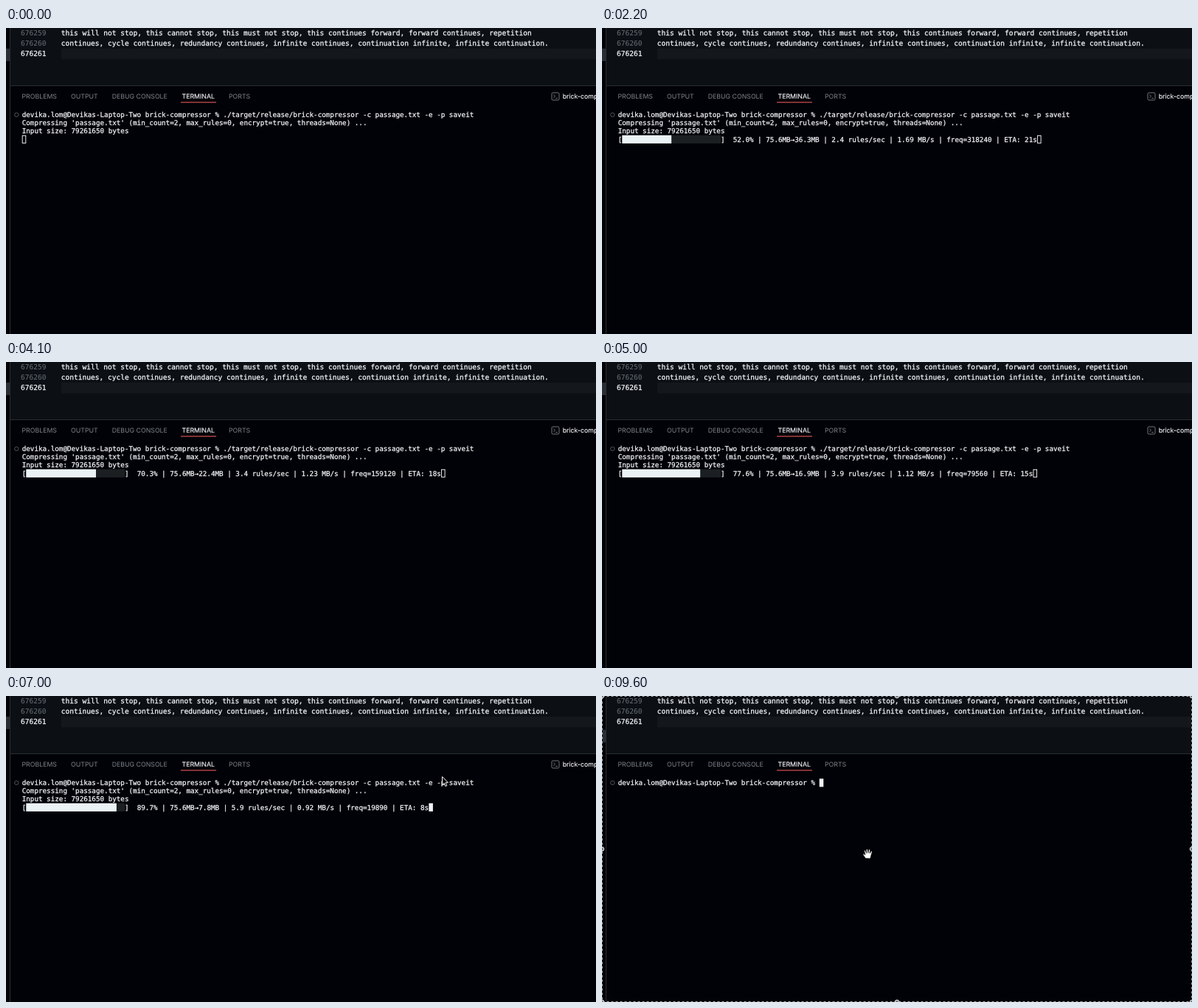
Recreate the animation shown at these times as an HTML page. Size 800x416 px, loop 9.7 s.

```html
<!DOCTYPE html>
<html lang="en">
<head>
<meta charset="utf-8">
<title>Terminal compression run</title>
<style>
  html, body { margin: 0; width: 100%; height: 100%; overflow: hidden; background: #010207; }
  svg { display: block; width: 800px; height: 416px; }
  text { white-space: pre; text-rendering: geometricPrecision; }
  .mono { font-family: "DejaVu Sans Mono", monospace; fill: #f6f8fb; stroke: #f6f8fb; stroke-width: .25px; }
  .editor { font-size: 9.565px; }
  .term { font-size: 9.255px; }
  .tab { font: 8.77px Inter, sans-serif; fill: #7d838b; }
  .on { fill: #f4f6f9; stroke: #f4f6f9; stroke-width: .12px; }
  .num { fill: #6a7078; stroke: none; }
</style>
</head>
<body>
<svg viewBox="0 0 800 416">
  <rect width="800" height="416" fill="#010207"/>
  <rect x="5" width="795" height="78" fill="#0c1015"/>
  <rect x="75" y="28" width="725" height="14.5" fill="#14171c"/>
  <rect id="handle" y="28" width="5" height="17" fill="#2a2e33"/>
  <path d="M5.5 0V416M5 78.5H800" stroke="#292d33" fill="none"/>
  <g id="editor"></g>
  <g id="tabs"></g>
  <rect x="237" y="100.4" width="48" height="1.3" fill="#c64c4e"/>
  <g id="label">
    <rect x="740" y="88" width="10" height="10" rx="1.5" fill="none" stroke="#8f949b" stroke-width=".8"/>
    <path d="M742.3 90.6l2.3 2.2-2.3 2.2M745.3 95.6h2.6" fill="none" stroke="#8f949b" stroke-width=".8"/>
    <text class="tab on" x="754.7" y="95.8">brick-compressor</text>
  </g>
  <g id="screen"></g>
  <path id="arrow" d="M0 0V11.2L2.6 8.8 4.4 13 6.3 12.2 4.5 8.1H8Z"
        fill="#000" stroke="#fff" stroke-width="1" stroke-linejoin="round"/>
  <g id="selection">
    <rect x=".5" y=".5" width="799" height="415" fill="none" stroke="#000"/>
    <rect x=".5" y=".5" width="799" height="415" fill="none" stroke="#a4a7ac" stroke-dasharray="3 3"/>
    <g id="grips" fill="#777c83" stroke="#e8eaed" stroke-width="1"></g>
    <path transform="translate(353.7 207.4) scale(1.06)" fill="#fff" stroke="#000" stroke-width=".6" stroke-linejoin="round"
          d="M3.5 12.5L.4 8.2Q-.2 6.8 1.2 6.8L3 8.2 1.8 3Q2 1.6 3.2 2.4L4.6 6 4.3 1.3Q5 0 6 1.1L6.7 5.7 7.5 1.2Q8.6.3 9.1 1.6L8.9 6.2 10.5 3.2Q11.8 2.8 11.8 4.2L10.2 10 9.4 12.8Z"/>
  </g>
</svg>
<script>
const LOOP = 9700, STEP = 100;
const LEFT = 21.7, TOP = 112.4, CELL = 5.572, ROW = 11.13, BAR = 24;
const START = 100, FOCUS = 6600, DONE = 8200, PROMPT = 8700, CLEAR = 9100, SELECT = 9600;
const MB = 79261650 / 2 ** 20;

const prompt = "devika.lom@Devikas-Laptop-Two brick-compressor % ";
const header = [
  prompt + "./target/release/brick-compressor -c passage.txt -e -p saveit",
  "Compressing 'passage.txt' (min_count=2, max_rules=0, encrypt=true, threads=None) ...",
  "Input size: 79261650 bytes"
];
const summary = [
  "No pair meets min_count (iter=857)",
  "",
  "Done. iterations=857 rules=856 final_seq_len=9 time=86.71s",
  "Compression ratio (estimated): 0.0% (75.6MB → 1.7KB)",
  "Estimated saved: 79259929 bytes (100.00%) (heuristic)",
  "Speed: 0.87 MB/s | 9.87 rules/sec"
];

// seconds, percent, elapsed, rules
const progress = [
  [0, 0, 0, 0], [.6, 25, 6.4, 9], [1.2, 34.96, 12.7, 23], [2, 50, 21.2, 48],
  [3, 60.2, 31.8, 86], [3.3, 63.9, 35, 98], [5, 77.6, 52.4, 204], [6, 84, 63, 305],
  [7, 89.7, 73.7, 435], [7.6, 94.6, 80.2, 610], [8.1, 99.2, 85.6, 810]
];
// start second, pair frequency
const freqs = [[0, 1272960], [.6, 636480], [1.5, 318240], [2.9, 159120], [4.3, 79560],
  [5.6, 39780], [6.7, 19890], [7.4, 9942], [7.9, 4971]];

const $ = id => document.getElementById(id);
const show = (id, on) => $(id).setAttribute("visibility", on ? "visible" : "hidden");
const text = (cls, x, y, s) => `<text class="${cls}" x="${x}" y="${y}">${s}</text>`;
const rect = (x, y, w, h, style) => `<rect x="${x}" y="${y}" width="${w}" height="${h}" ${style}/>`;
const col = n => LEFT + n * CELL;
const line = (s, row, column = 0) => text("mono term", col(column), TOP + 8.75 + row * ROW, s);
const mark = row => `<circle cx="14.3" cy="${TOP + 5.6 + row * ROW}" r="2.7" fill="none" stroke="#555a61" stroke-width=".9"/>`;

function cursor(column, row, filled) {
  const x = col(column), y = TOP + row * ROW;
  return filled ? rect(x, y, CELL, ROW, 'fill="#eef2f6"')
    : rect(x + .5, y + .5, CELL - 1, ROW - 1, 'fill="none" stroke="#e6e9ed"');
}

function sample(s) {
  const i = Math.max(1, progress.findIndex(p => s <= p[0]));
  const a = progress[i - 1], b = progress[i], k = (s - a[0]) / (b[0] - a[0]);
  return a.map((v, n) => v + (b[n] - v) * k);
}

function status(s) {
  const [, pct, elapsed, rules] = sample(s);
  const left = MB * (1 - pct / 100);
  const size = left < 1 ? (left * 1024).toFixed(1) + "KB" : left.toFixed(1) + "MB";
  const freq = freqs.filter(f => f[0] <= s + 1e-6).pop()[1];
  const eta = Math.round(elapsed * (100 - pct) / pct);
  return [pct, `${pct.toFixed(1).padStart(5)}% | 75.6MB→${size} | ${(rules / elapsed).toFixed(1)} rules/sec | ` +
    `${((MB - left) / elapsed).toFixed(2)} MB/s | freq=${freq} | ETA: ${eta}s`];
}

function bar(pct, info) {
  const y = TOP + 3 * ROW, full = Math.round(BAR * pct / 100);
  return line("[", 3) + line("]", 3, BAR + 1) + line(info, 3, 27) +
    rect(col(1), y, BAR * CELL, ROW, 'fill="#1b1f22"') +
    rect(col(1), y, full * CELL, ROW, 'fill="#eaf2f5"');
}

function screen(t) {
  if (t >= CLEAR) return mark(0) + line(prompt, 0) + cursor(prompt.length, 0, true);
  let out = mark(0) + header.map((s, i) => line(s, i)).join("");
  if (t < START) return out + cursor(0, 3, false);
  if (t < DONE) {
    const [pct, info] = status(t / 1000);
    return out + bar(pct, info) + cursor(27 + info.length, 3, t >= FOCUS);
  }
  out += bar(100, " 99.9% | 75.6MB→4.1KB | 9.8 rules/sec | 0.87 MB/s | freq=4971 | ETA: 0s");
  out += summary.map((s, i) => line(s, i + 4)).join("");
  return t < PROMPT ? out + cursor(0, 10, true)
    : out + mark(12) + line(prompt, 12) + cursor(prompt.length, 12, true);
}

function render(t) {
  $("screen").innerHTML = screen(t);
  const slide = Math.min(1, Math.max(0, (t - 6000) / 500));
  const ease = slide * slide * (3 - 2 * slide);
  $("arrow").setAttribute("transform", `translate(${647.5 - 56 * ease} 109.7)`);
  show("arrow", t >= 5800 && t < CLEAR);
  show("label", t < PROMPT);
  show("selection", t >= SELECT);
  $("handle").setAttribute("y", t < PROMPT ? 28 : 46);
}

[
  ["676259", "this will not stop, this cannot stop, this must not stop, this continues forward, forward continues, repetition"],
  ["676260", "continues, cycle continues, redundancy continues, infinite continues, continuation infinite, infinite continuation."],
  ["676261", ""]
].forEach(([n, s], i) => {
  const y = 9.7 + i * 14.2;
  $("editor").innerHTML += text("mono editor" + (s ? " num" : ""), 20, y, n) + text("mono editor", 74.8, y, s);
});

$("tabs").innerHTML = [["PROBLEMS", 21.5], ["OUTPUT", 88], ["DEBUG CONSOLE", 143.7], ["TERMINAL", 238.5], ["PORTS", 302]]
  .map(([s, x]) => text(s === "TERMINAL" ? "tab on" : "tab", x, 95.7, s)).join("");

for (const x of [0, 400, 800]) for (const y of [0, 208, 416])
  if (x !== 400 || y !== 208) $("grips").innerHTML += `<circle cx="${x}" cy="${y}" r="2.8"/>`;

const origin = performance.now();
let last = -1;
function tick() {
  const t = Math.floor((performance.now() - origin) % LOOP / STEP) * STEP;
  if (t !== last) render(last = t);
  requestAnimationFrame(tick);
}
tick();
</script>
</body>
</html>
```
